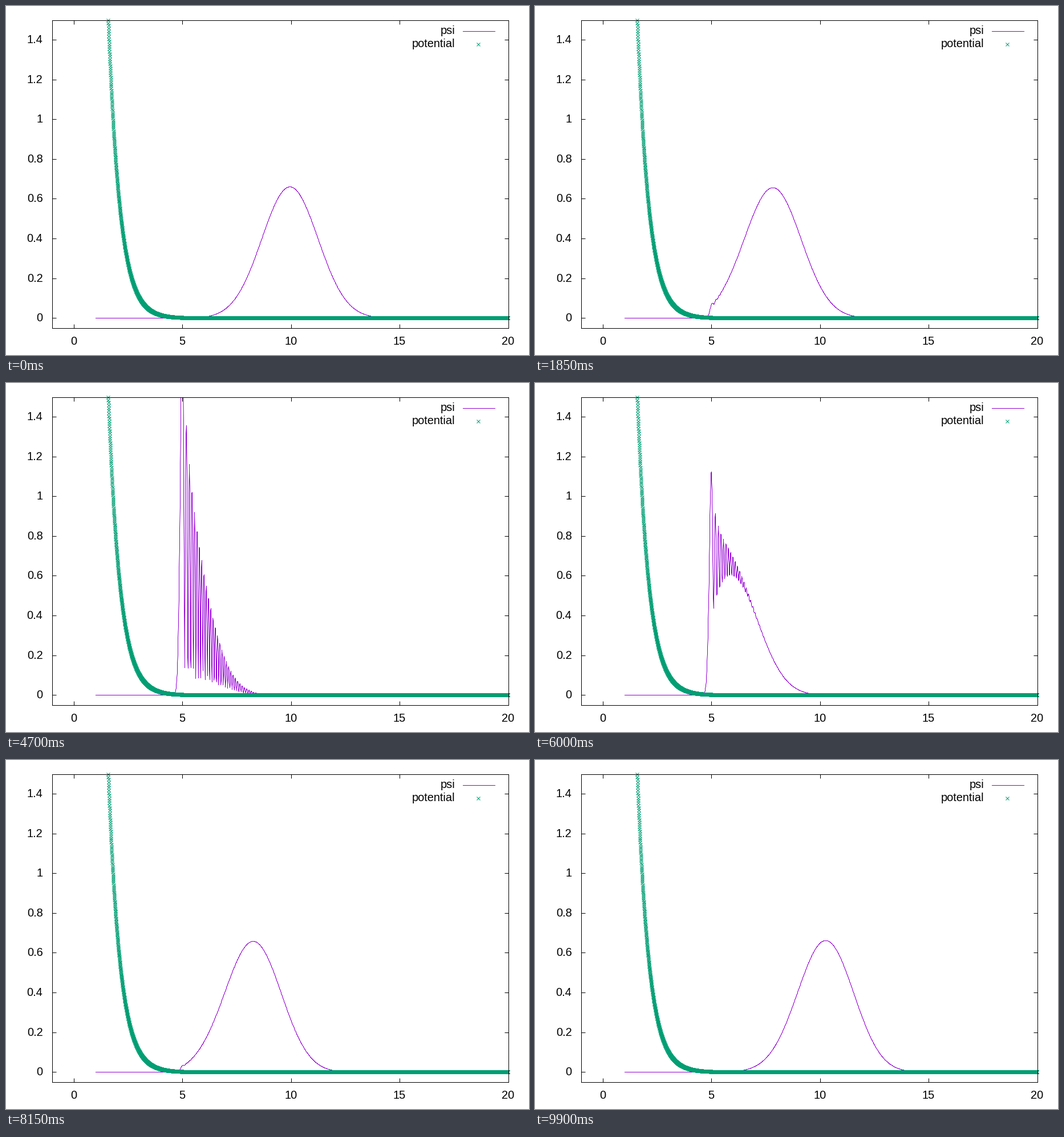
Recreate the animation shown at these times as a matplotlib script. Size 917 by 611 pixels, loop 9.95 s.

```python
import numpy as np
import matplotlib.pyplot as plt
from matplotlib.animation import FuncAnimation

W, H, DPI = 917, 611, 100
PX = 72 / DPI                      # one pixel in points
FRAMES, INTERVAL = 199, 50
VIOLET, GREEN = "#9400d3", "#009e73"
LEFT, RIGHT, TOP, BOTTOM = 80.5, 880.5, 24.5, 563.5
X_MIN, X_MAX, Y_MIN, Y_MAX = -1, 20, -0.05, 1.5

plt.rcParams["font.family"] = "Liberation Sans"
plt.rcParams["path.simplify"] = False

# Wave packet: mean wave number, start, sharpness, speed per frame
K0, START, SHARP, SPEED = 30.0, 10.0, 0.3, 0.0571
SPREAD = 0.4                       # strength of the dispersion
ENERGY = K0 ** 2 / 2
# Repulsive wall with a shallow well behind it
DEPTH, DECAY, WELL_X = 0.06 * ENERGY, 0.92, 6.698
V_SCALE = 1.265e-4 / DEPTH


def potential(x):
    y = np.exp(-DECAY * (x - WELL_X))
    return DEPTH * (y * y - 2 * y)


def solve():
    """Return grid, stationary states, their weights and frequencies."""
    a, b, dx = 4.0, 16.0, 0.01
    x = np.linspace(a, b, round((b - a) / dx) + 1)
    k = np.arange(1, 301) * np.pi / (b - a)
    basis = np.sqrt(2 / (b - a)) * np.sin(np.outer(x - a, k))
    ham = np.diag(k ** 2 / 2) + basis.T @ (potential(x)[:, None] * basis) * dx
    energy, vec = np.linalg.eigh(ham)
    states = basis @ vec
    packet = (2 * SHARP / np.pi) ** 0.25 * np.exp(
        -SHARP * (x - START) ** 2 - 1j * K0 * x)
    weights = states.T @ packet * dx
    dk = np.sqrt(2 * np.abs(energy)) - K0
    omega = SPEED * (dk + SPREAD * dk ** 2 / (2 * K0))
    return x, states, weights, omega


grid, states, weights, omega = solve()
line_x = np.concatenate(([1.0], grid, [20.0]))


def psi(step):
    wave = states @ (weights * np.exp(-1j * omega * step))
    return np.concatenate(([0.0], np.abs(wave), [0.0]))


fig = plt.figure(figsize=(W / DPI, H / DPI), dpi=DPI, facecolor="white")
ax = fig.add_axes([LEFT / W, 1 - BOTTOM / H,
                   (RIGHT - LEFT) / W, (BOTTOM - TOP) / H])
ax.set_xlim(X_MIN, X_MAX)
ax.set_ylim(Y_MIN, Y_MAX)


def to_x(px):
    return X_MIN + (px - LEFT) / (RIGHT - LEFT) * (X_MAX - X_MIN)


def to_y(py):
    return Y_MIN + (BOTTOM - py) / (BOTTOM - TOP) * (Y_MAX - Y_MIN)


def label(px, baseline, text, ha):
    fig.text(px / W, 1 - baseline / H, text, ha=ha, va="baseline",
             fontsize=20 * PX, color="black")


x_ticks = np.arange(0, 21, 5)
y_ticks = np.arange(0, 8) * 0.2
ax.set_xticks(x_ticks, labels=[])
ax.set_yticks(y_ticks, labels=[])
ax.tick_params(direction="in", top=True, right=True,
               length=7 * PX, width=PX, color="black")
for spine in ax.spines.values():
    spine.set_linewidth(PX)

for v in x_ticks:
    px = LEFT + (v - X_MIN) / (X_MAX - X_MIN) * (RIGHT - LEFT)
    label(px, 593, f"{v:g}", "center")
for v in y_ticks:
    py = BOTTOM - (v - Y_MIN) / (Y_MAX - Y_MIN) * (BOTTOM - TOP)
    label(64.5, py + 6, f"{v:g}", "right")

line_style = dict(color=VIOLET, lw=PX, snap=True)
cross_style = dict(color=GREEN, ls="none", marker="x", ms=6 * PX, mew=PX,
                   clip_on=False)

# Key
label(787, 49, "psi", "right")
label(787, 72, "potential", "right")
ax.plot([to_x(800.5), to_x(856.5)], [to_y(43.5)] * 2, **line_style)
ax.plot([to_x(828.2)], [to_y(67.2)], **cross_style)

curve, = ax.plot(line_x, psi(1), zorder=2, **line_style)
wall_x = np.arange(1, 20.001, 0.005)
wall_y = potential(wall_x) * V_SCALE
shown = wall_y <= Y_MAX
ax.plot(wall_x[shown], wall_y[shown], zorder=2.2, **cross_style)


def draw(i):
    curve.set_ydata(psi(i + 1))
    return curve,


anim = FuncAnimation(fig, draw, frames=FRAMES, interval=INTERVAL,
                     repeat=True, repeat_delay=0)
plt.show()
```
